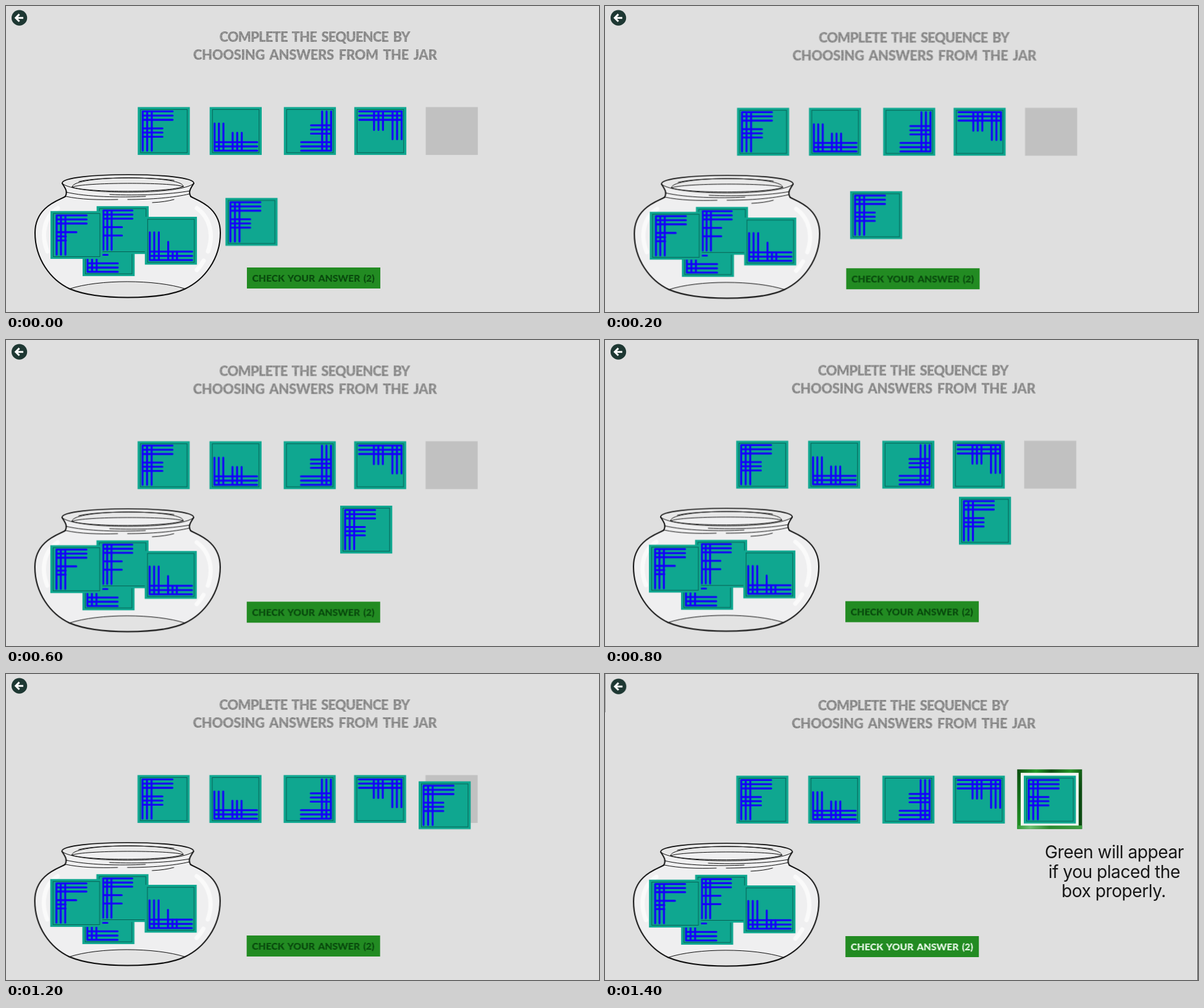
Write an HTML page that moves like this. It is 960x495 px and loops after 2000 ms.

```html
<!DOCTYPE html>
<html lang="en">
<head>
<meta charset="utf-8">
<title>Complete the sequence</title>
<style>
html, body { margin: 0; width: 100%; height: 100%; overflow: hidden; background: #dfdfdf; }
svg { display: block; width: 960px; height: 495px; }
text { text-anchor: middle; }
.hand { font: 900 22px Lato, sans-serif; letter-spacing: -.43px; word-spacing: 3.4px; fill: #828282; }
.tight { letter-spacing: -.9px; }
.check { font-size: 15.8px; letter-spacing: -.1px; word-spacing: 2px; fill: #07460c; }
.note { font: 400 28.2px Inter, "Noto Sans", sans-serif; letter-spacing: -.52px; fill: #171717; }
.ink { fill: none; stroke: #0b0b0b; stroke-linecap: round; stroke-linejoin: round; }
.thin { stroke-width: 1; }
.bars { fill: none; stroke: #1400fa; stroke-width: 3.1; stroke-linecap: round; }
.card { fill: #0fa790; }
.inset { fill: none; stroke: #075f53; stroke-width: 1; }

#scene, #drag, .check, #done, #edge, #back { animation: 2s step-end infinite; }
#scene { animation-name: shake; }
#drag { animation-name: drag; }
.check { animation-name: lit; }
#done { animation-name: done; }
#edge { animation-name: edge; }
#back { animation-name: back; }

@keyframes shake {
  0% { transform: translate(0, 0); }
  10% { transform: translate(.5px, 1.2px); }
  20% { transform: translate(0, .7px); }
  30% { transform: translate(-.3px, .3px); }
  40% { transform: translate(-.9px, -.5px); }
  50% { transform: translate(-.6px, -.2px); }
  60% { transform: translate(-.4px, 0); }
  70% { transform: translate(-.8px, 1px); }
}
@keyframes drag {
  0% { transform: translate(355.3px, 310.5px); }
  10% { transform: translate(396.8px, 299.6px); }
  20% { transform: translate(501px, 280.5px); }
  30% { transform: translate(541px, 268px); }
  40% { transform: translate(573px, 253.6px); }
  50% { transform: translate(622px, 213px); }
  60% { transform: translate(668px, 173.6px); }
  70% { transform: translate(678px, 164.5px); }
}
@keyframes lit { 0% { fill: #07460c; } 70% { fill: #f4fff4; } }
@keyframes done { 0% { opacity: 0; } 70% { opacity: 1; } }
@keyframes edge { 0% { opacity: 0; } 40% { opacity: 1; } 50% { opacity: 0; } 70% { opacity: 1; } }
@keyframes back { 0% { transform: translate(0, 0); } 70% { transform: translate(.3px, 1px); } }
</style>
</head>
<body>
<svg viewBox="0 0 960 495">
  <defs>
    <pattern id="scratch" width="7" height="6" patternUnits="userSpaceOnUse" patternTransform="rotate(-32)">
      <rect width="7" height="6" fill="#fff"/>
      <path d="M0 1.2H4.6M2.4 3.2H6.6M.5 5.1H3.4" stroke="#777" stroke-width=".8"/>
    </pattern>
    <mask id="sketch" maskUnits="userSpaceOnUse" x="0" y="0" width="960" height="495">
      <rect width="960" height="495" fill="url(#scratch)"/>
    </mask>
    <linearGradient id="leaf" x2="1" y2=".25">
      <stop offset="0" stop-color="#0a4a10"/>
      <stop offset=".28" stop-color="#239a26"/>
      <stop offset=".5" stop-color="#0b4d10"/>
      <stop offset=".78" stop-color="#249326"/>
      <stop offset="1" stop-color="#0b4a10"/>
    </linearGradient>
    <linearGradient id="glow">
      <stop offset="0" stop-color="#2f9a35"/>
      <stop offset=".2" stop-color="#6cc070"/>
      <stop offset=".5" stop-color="#2b8a30"/>
      <stop offset="1" stop-color="#3fa044"/>
    </linearGradient>
  </defs>

  <rect width="960" height="495" fill="#dfdfdf"/>

  <g id="back">
    <circle cx="21.6" cy="19.2" r="12.6" fill="#1e3833"/>
    <path d="M28 19.2H16.500M21.600 13.400L15.800 19.200L21.600 25" fill="none" stroke="#fff" stroke-width="3"/>
  </g>

  <g id="scene">
    <g class="hand" mask="url(#sketch)">
      <text class="tight" x="499.600" y="58.400">COMPLETE THE SEQUENCE BY</text>
      <text x="500.300" y="87.200">CHOOSING ANSWERS FROM THE JAR</text>
    </g>

    <rect x="679.5" y="163.5" width="84.3" height="77.4" fill="#c1c1c1"/>
    <g id="row"></g>

    <path d="M91 287C97 296 100 301 96 308C91 313 47 322 47 367C47 409 72 443 103 457.500C126 467 160 471.500 197 471.500C235 471.500 270 467 290 457.500C321 443 347 409 347 367C347 322 304 313 299 308C295 301 298 296 304 287C304 268 91 268 91 287Z" fill="#efeff0"/>
    <path d="M103 457.500C150 442 242 442 290 457.500C270 467 235 471.500 197 471.500C160 471.500 126 467 103 457.500Z" fill="#e3e3e3"/>
    <path d="M91 286C91 268 304 268 304 286C290 310 105 310 91 286Z" fill="#e8e8e8"/>
    <path d="M107 293C125 285 268 285 287 292C268 302 130 302 107 293Z" fill="#efeff0"/>
    <g fill="none" stroke="#fafafa" stroke-width="7" stroke-linecap="round">
      <path d="M84 327C60 342 57 372 67 397M309 327C330 342 337 370 327 397M320 412Q315 421 309 427"/>
    </g>
    <g class="ink" stroke-width="2">
      <path d="M96 308C91 313 47 322 47 367C47 409 72 443 103 457.500C126 467 160 471.500 197 471.500C235 471.500 270 467 290 457.500C321 443 347 409 347 367C347 322 304 313 299 308"/>
      <path d="M91 287C97 296 100 301 96 308M304 287C298 296 295 301 299 308"/>
      <path d="M91 287C88 268 307 268 304 287" stroke-width="1.7"/>
    </g>
    <g class="ink thin">
      <path d="M91 287C110 306 285 306 304 287"/>
      <path d="M107 293C105 273 290 273 287 292M107 293C130 302 265 302 287 292"/>
      <path d="M107 293C125 285 268 285 287 292M118 284C145 277 225 276 272 282"/>
      <path d="M97 301C130 309 185 310 226 308M168 305C215 307 265 305 298 299"/>
      <path d="M97 308C120 313 150 314 181 313M197 313C235 313 272 310 297 304M237 318Q258 317 272 313"/>
      <path d="M103 457.500C150 442 242 442 290 457.500"/>
    </g>
    <g id="jar"></g>

    <rect x="390" y="423" width="216" height="34" fill="#228b22"/>
    <g mask="url(#sketch)"><text class="hand check" x="497.500" y="445.600">CHECK YOUR ANSWER (2)</text></g>
  </g>

  <g id="done">
    <rect x="667.300" y="154.300" width="105" height="96.400" fill="url(#leaf)"/>
    <rect x="667.300" y="245" width="105" height="5.700" fill="url(#glow)"/>
    <rect x="673" y="159.800" width="93.800" height="85.400" fill="#f1f5f1"/>
    <g class="note">
      <text x="824.500" y="298">Green will appear</text>
      <text x="824.300" y="329.700">if you placed the</text>
      <text x="823.500" y="361.300">box properly.</text>
    </g>
    <path d="M.5 0V62" stroke="#999"/>
  </g>
  <g id="drag"></g>
  <path id="edge" d="M959.500 0V495" stroke="#555"/>
</svg>

<script>
const across = (x1, x2, ...ys) => ys.map(y => `M${x1} ${y}H${x2}`).join('');
const down = (y1, y2, ...xs) => xs.map(x => `M${x} ${y1}V${y2}`).join('');

const card = (x, y, bars) => `<g transform="translate(${x} ${y})">
  <rect class="card" width="84.3" height="77.4"/>
  <rect class="inset" x="4.5" y="4" width="75.5" height="69.7"/>
  <path class="bars" d="${bars}"/></g>`;

const F = down(7, 70.5, 8, 15.3, 22.7) + across(8, 56.5, 7, 13.8, 20.6) + across(8, 40, 34.5, 41.3, 48);
const left = across(8, 77, 56.7, 63.6, 70.5) + down(26.5, 70.5, 8, 15, 22.3) + down(41.5, 70.5, 37.2, 44.6, 52);
const half = down(7, 70.5, 62, 69.2, 76.5) + across(28, 76.5, 56.7, 63.6, 70.5) + across(44, 76.5, 29.5, 36.2, 43);
const right = across(8, 77, 7, 13.8, 20.6) + down(7, 52, 62, 69.3, 76.7) + down(7, 37, 32, 39.2, 46.5);
const flip = down(7, 70.5, 8, 15.3, 22.7) + across(8, 57, 56.7, 63.6, 70.5) + across(8, 40.5, 29.5, 36.2, 43);
const gapF = down(7, 70.5, 11, 17.3, 24.3) + across(11, 58, 7, 13.6, 20.2) + across(11, 41, 34, 47.5);
const shortF = down(7, 70.5, 10, 17, 24.2) + across(10, 58.5, 7, 13.6, 20.2) + across(10, 42, 34.2) + across(10, 25, 41, 47.5);
const shortL = across(8, 76.5, 56.3, 63.2, 70) + down(25, 70, 8, 15.2, 22.6) + down(40.5, 70, 37.8) + down(56, 70, 45, 52);

const fill = (id, cards) => {
  document.getElementById(id).innerHTML = cards.map(c => card(...c)).join('');
};
fill('row', [[213.3, 163.5, F], [329.7, 163.5, left], [449.8, 163.5, half], [563.8, 163.5, right]]);
fill('jar', [[124, 359.5, flip], [146.7, 323.8, gapF], [72, 331.7, shortF], [224.8, 341, shortL]]);
fill('drag', [[0, 0, F]]);
</script>
</body>
</html>
```
